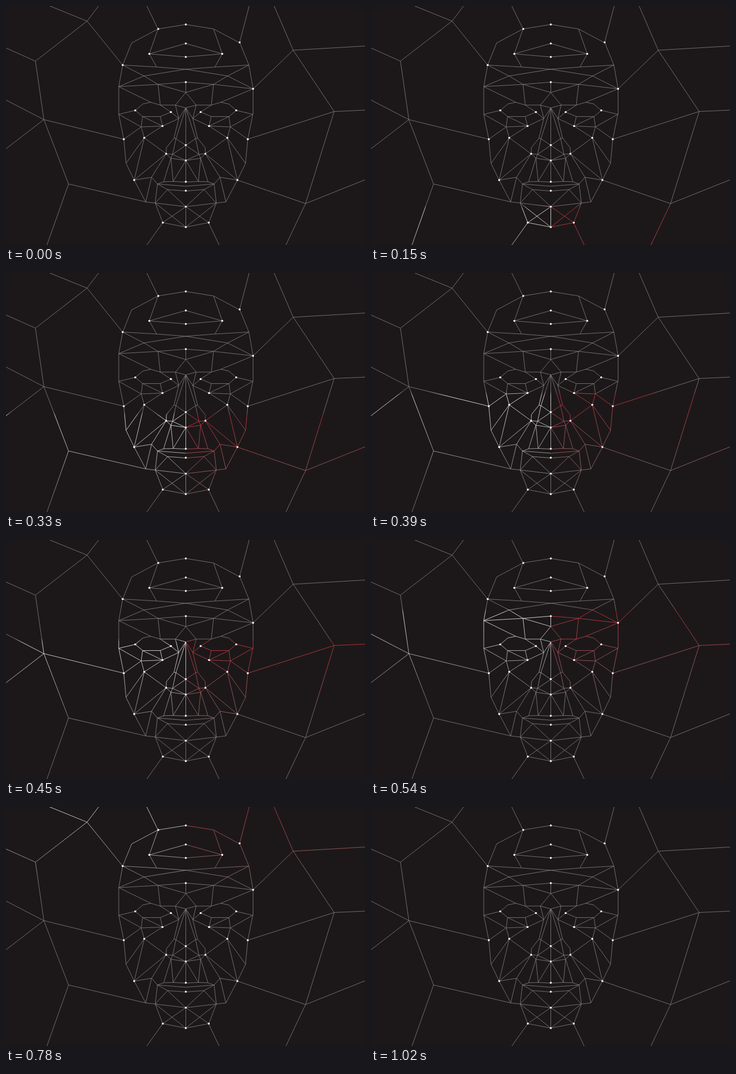
An HTML page with a canvas for the animation above (2280 ms loop, 640x427 px).

```html
<!DOCTYPE html>
<html lang="en">
<head>
<meta charset="utf-8">
<title>Wireframe face scan</title>
<style>
  html, body { margin: 0; width: 100%; height: 100%; overflow: hidden; background: #1c1819; }
  canvas { display: block; width: 640px; height: 427px; }
</style>
</head>
<body>
<canvas id="stage" width="640" height="427"></canvas>
<script>
const WIDTH = 640, HEIGHT = 427, AXIS = 320.5;
const LOOP = 2280, STEP = 30;
const SPEED = 0.6, TAIL = 160, LEAD = 4;
const BACKGROUND = '#1c1819', LINE = '#858284';

const ctx = document.getElementById('stage').getContext('2d');

// Left half of the face, mirrored about AXIS.
const skull = `M320.5 33L271 41L224 66L208 105.5M271 41L255.5 85.5L320.5 67
  M320.5 91L255.5 85.5L268.5 109M208 105.5L268.5 109L320.5 113L246 125
  M208 105.5L246 125L271 140L320.5 154.5L302 177H275L258 172M320.5 136L271 140L275 177
  M201 193.5L210 238L214 281L228.5 311L249 350L266 352L279.5 387L320.5 395`;

const eye = `M201 193.5L230.5 186.5L244 175L258 172M275 177L294 189.5L275 197.5H243.5L230.5 186.5
  M294 189.5L308 201L279 214.5L275 197.5M243.5 197.5L279 214.5L241 216L243.5 197.5
  M201 193.5L241 216L210 238M241 216L246.5 235.5L279 214.5
  M214 281L246.5 235.5L228.5 311M246.5 235.5L285.5 264`;

const nose = `M302 177L320.5 182L308 201L302 177M308 201L299.5 236L286 253L285.5 264
  M320.5 182L303 237L297 265L285.5 264M299.5 236L303 237L320.5 249L297 265L320.5 276
  M285.5 264L294 272L320.5 276L298 313.5L294 272L281 314M297 265L294 272
  M228.5 311L285.5 264L259.5 306`;

const mouth = `M228.5 311L259.5 306L249 350M259.5 306L270 318L281 314L298 313.5L320.5 314.5
  M320.5 322L270 318L266 352L288 328L320.5 358.5M270 318L288 328L320.5 330.5
  M320.5 395L266 352L320.5 358.5L279.5 387`;

const centre = 'M320.5 136V154.5M320.5 182V314M320.5 358.5V395';

const temples = `M208 105.5L201 144V193.5M246 125L201 144L271 140M201 144L258 172
  M433 105.5L440.5 148V193.5M395 125L440.5 148L370 140M440.5 148L383 172`;

const web = `M78 0L144.5 27L165 0M208 105.5L144.5 27L52.5 98.5L0 75M52.5 98.5L67.5 203L0 168
  M0 255L67.5 203L210 238M67.5 203L111.5 318L73 427M111.5 318L249 350M279.5 387L251 427
  M251 0L271 41M416.5 65L433.5 0M478 0L512 79L640 71.5M440.5 148L512 79L585 188.5L640 186
  M431 238L585 188.5L534 353L640 310.5M499 427L534 353L412.5 311M361 387L380 427`;

const half = new Path2D(skull + eye + nose + mouth);
const lines = new Path2D(centre + temples + web);
lines.addPath(half);
lines.addPath(half, new DOMMatrix([-1, 0, 0, 1, 2 * AXIS, 0]));

const pairedDots = [
  [255.5, 85.5], [230.5, 186.5], [294, 189.5], [279, 214.5], [246.5, 235.5],
  [210, 238], [285.5, 264], [228.5, 311], [279.5, 387]
];
const dots = [
  ...pairedDots,
  ...pairedDots.map(([x, y]) => [2 * AXIS - x, y]),
  ...[33, 67, 91, 136, 248.5, 276, 314, 330, 358.5, 395].map(y => [AXIS, y]),
  [271.5, 41], [208, 105.5], [416.5, 65], [440.5, 148]
];

function strokeSide(left, right, glow, front) {
  const paint = ctx.createLinearGradient(0, front - LEAD, 0, front + TAIL);
  paint.addColorStop(0, LINE);
  paint.addColorStop(2 * LEAD / (TAIL + LEAD), glow);
  paint.addColorStop(1, LINE);
  ctx.save();
  ctx.beginPath();
  ctx.rect(left, 0, right - left, HEIGHT);
  ctx.clip();
  ctx.strokeStyle = paint;
  ctx.lineWidth = 0.8;
  ctx.stroke(lines);
  ctx.restore();
}

function draw(now) {
  const time = Math.floor(now % LOOP / STEP) * STEP;
  const front = 449 - SPEED * time;
  ctx.fillStyle = BACKGROUND;
  ctx.fillRect(0, 0, WIDTH, HEIGHT);
  strokeSide(0, 321, '#ffffff', front);
  strokeSide(321, WIDTH, '#d8323c', front);
  ctx.fillStyle = '#fff';
  for (const [x, y] of dots) {
    ctx.beginPath();
    ctx.arc(x, y, 1.8, 0, 2 * Math.PI);
    ctx.fill();
  }
}

const start = performance.now();
function tick() {
  draw(performance.now() - start);
  requestAnimationFrame(tick);
}
tick();
</script>
</body>
</html>
```
